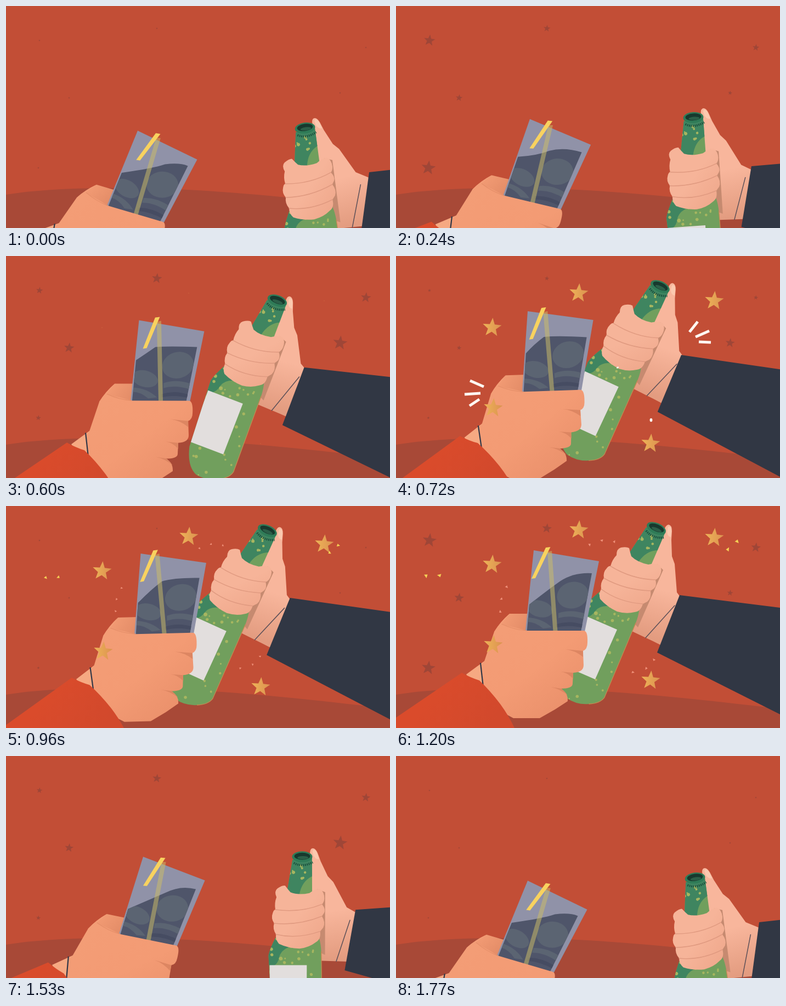
Recreate the animation shown at these times as an HTML page with a canvas. Size 700 by 406 pixels, loop 1800 ms.

```html
<!DOCTYPE html>
<html lang="en">
<head>
<meta charset="utf-8">
<title>Cheers</title>
<style>
html, body { margin: 0; width: 100%; height: 100%; overflow: hidden; background: #c24e36; }
canvas { display: block; }
</style>
</head>
<body>
<canvas id="stage" width="700" height="406"></canvas>
<script>
const ctx = document.getElementById('stage').getContext('2d');
const LOOP = 1800;
const TIMES = [0, 240, 480, 720, 1200, 1530, 1770, LOOP];

// Motion channels: one value per time, returning to the first at the end
const GLASS = { x: [240, 244, 245, 240, 251, 250], y: [228, 207, 143, 101, 81, 184],
  r: [16.4, 13.4, 4, -1.9, 0, 11.5], pivot: [251, 81] };
const BOTTLE = { x: [545, 542, 514, 482, 475, 540], y: [222, 203, 122, 55, 40, 183],
  r: [-31, -27.5, -10.3, 1.3, 0, -23.5], pivot: [475, 40] };
const SLEEVE = { x: [662, 648, 583, 520, 517, 637], y: [304, 293, 237, 181, 163, 281],
  r: [-13.7, -12, -4.3, 1.2, 0, -11.2], pivot: [517, 163] };
const LIQUID = { left: [163, 153, 152, 158, 180, 180], midX: [316, 299, 285, 279, 300, 303],
  midY: [126, 129, 131, 129, 137, 138], right: [117, 118, 126, 132, 123, 120] };
const STRAW = [1, 0.95, 1, 0.3, 0, 0.88];
const RISE = [24, 24, 24, 24, 0, 0];

const clamp = v => Math.max(0, Math.min(1, v));
const ramp = (t, a, b) => clamp((t - a) / (b - a));
const smooth = u => u * u * (3 - 2 * u);

// Monotone cubic through the channel's values
function at(channel, t) {
  const v = [...channel, channel[0], channel[0]];
  const slope = k => (v[k + 1] - v[k]) / (TIMES[k + 1] - TIMES[k]);
  const tangent = k => {
    if (k === 0 || k === v.length - 1) return 0;
    const a = slope(k - 1), b = slope(k);
    return a * b > 0 ? 2 * a * b / (a + b) : 0;
  };
  let i = 0;
  while (i < TIMES.length - 2 && t >= TIMES[i + 1]) i++;
  const h = TIMES[i + 1] - TIMES[i], u = (t - TIMES[i]) / h, s = smooth(u);
  return v[i] * (1 - s) + v[i + 1] * s
    + h * u * (1 - u) * ((1 - u) * tangent(i) - u * tangent(i + 1));
}

function fill(path, color) {
  ctx.fillStyle = color;
  ctx.fill(typeof path === 'string' ? new Path2D(path) : path);
}

function stroke(path, color, width, cap = 'round') {
  ctx.strokeStyle = color;
  ctx.lineWidth = width;
  ctx.lineCap = cap;
  ctx.stroke(new Path2D(path));
}

function blend(x0, y0, x1, y1, ...colors) {
  const g = ctx.createLinearGradient(x0, y0, x1, y1);
  colors.forEach((c, i) => g.addColorStop(i / (colors.length - 1), c));
  return g;
}

function oval(x, y, rx, ry, turn, color) {
  ctx.beginPath();
  ctx.ellipse(x, y, rx, ry, turn, 0, Math.PI * 2);
  ctx.fillStyle = color;
  ctx.fill();
}

function posed(pose, t, draw) {
  ctx.save();
  ctx.translate(at(pose.x, t), at(pose.y, t));
  ctx.rotate(at(pose.r, t) * Math.PI / 180);
  ctx.translate(-pose.pivot[0], -pose.pivot[1]);
  draw(t);
  ctx.restore();
}

function clipped(path, draw) {
  ctx.save();
  ctx.clip(path);
  draw();
  ctx.restore();
}

function star(x, y, radius, turn, color) {
  ctx.beginPath();
  for (let i = 0; i < 10; i++) {
    const a = turn + i * Math.PI / 5, r = i % 2 ? radius * 0.42 : radius;
    ctx.lineTo(x + r * Math.sin(a), y - r * Math.cos(a));
  }
  ctx.fillStyle = color;
  ctx.fill();
}

// Background stars: x, y and the moment of full size within 900 ms
const TWINKLES = [[61, 63, 330], [275, 41, 460], [656, 76, 460],
  [115, 168, 460], [609, 159, 620], [59, 296, 230]];

function backdrop(t) {
  fill('M0 0H700V406H0Z', '#c24e36');
  fill('M0 345C90 330 230 331 330 336S560 354 700 371V406H0Z', '#a84937');
  const p = t % 900;
  for (const [x, y, peak] of TWINKLES) {
    const u = p < peak ? p / (2 * peak) : 0.5 + (p - peak) / (2 * (900 - peak));
    star(x, y, 1.8 + 11.8 * Math.sin(Math.PI * u) ** 3, 0.12, '#9f4637');
  }
}

// Bottle and right hand
const bottleShape = new Path2D('M456 39L422 91L380 150Q354 170 346 182L302 300' +
  'Q296 336 312 352Q330 364 352 362Q372 361 380 350L437 214Q446 190 442 180L465 108L490 50Z');
let seed = 11;
const random = () => (seed = seed * 16807 % 2147483647) / 2147483647;
const bubbles = Array.from({ length: 150 }, () =>
  [300 + random() * 190, 55 + random() * 305, 1.2 + random() * 2.3]);

function bottle() {
  // Thumb, palm and wrist
  fill('M488 48Q491 34 497 34Q503 35 503 46L502 62L503 92L508 106L512 158L527 178' +
    'L490 258L468 247L430 229L440 180L462 108Z',
    blend(450, 235, 475, 150, '#e39c80', '#f8b69c'));
  fill('M496 38Q503 35 502 48L501 57Q495 56 494 47Z', '#fbc9af');
  fill('M476 106L487 117L441 222L432 212Z', '#c68a70');
  stroke('M508 182L455 241', '#5b5058', 1.5);

  fill(bottleShape, '#719f5d');
  clipped(bottleShape, () => {
    fill('M450 20H500L480 81Q460 80 446 97L436 110L410 100Z', '#3f8560');
    fill('M385 140L394 184Q374 180 364 191Q354 206 342 202L330 180Z', '#3f8560');
    for (const [x, y, r] of bubbles) oval(x, y, r, r, 0, '#a7b660');
    fill('M341 199L403 226L363 317L301 290Z', '#e2dedd');
  });
  stroke('M437 214L380 350Q372 361 352 362', '#c08a52', 1.3);

  // Lip
  ctx.setLineDash([2, 1.5]);
  stroke('M456 45Q466 59 488 58', '#1d5440', 4, 'butt');
  ctx.setLineDash([]);
  oval(474.5, 41, 18.5, 10, 0.41, '#2f7b57');
  oval(475, 40, 14.5, 6.5, 0.41, '#17392e');
  oval(475, 43, 10, 3, 0.41, '#2c5f48');

  // Fingers
  fill('M402 90Q402 78 410 76Q420 74 425 77Q427 86 429 92Q440 103 460 107Q474 104 481 108' +
    'Q486 116 481 127Q478 133 473 135Q476 146 470 151L464 155Q466 168 458 175L450 179' +
    'Q446 193 435 194Q420 198 403 193Q384 184 372 170Q369 160 374 152Q372 140 379 132' +
    'Q377 121 384 114Q388 109 391 110Q394 98 402 90Z',
    blend(390, 90, 440, 194, '#f6b499', '#f6b499', '#f0a98d'));
  for (const crease of ['M391 110Q430 134 473 135', 'M379 132Q418 154 464 155',
    'M374 152Q406 176 450 179'])
    stroke(crease, '#e09a80', 1.5);
}

function rightSleeve() {
  fill('M517 163L476 268L900 482V211Z', '#313744');
}

// Glass and left hand
function glass(t) {
  fill('M207 197H244V236H182L179 230Q190 212 207 197Z',
    blend(195, 205, 235, 230, '#f29b74', '#e38c67'));
  fill('M251 81L370 101L342 240L235 238Z', '#9092a8');

  const left = at(LIQUID.left, t), mx = at(LIQUID.midX, t),
    my = at(LIQUID.midY, t), right = at(LIQUID.right, t);
  const lx = 253 - 0.1 * (left - 81);
  const liquid = new Path2D(`M${lx} ${left}Q${mx - 20} ${my + 14} ${mx} ${my}` +
    `Q${mx + 25} ${Math.min(my, right) - 2} 357 ${right}L336 236H238Z`);
  fill(liquid, '#4f556a');
  clipped(liquid, () => {
    const light = '#5b6472';
    oval(322, 163, 29, 24, -0.3, light);
    oval(262, 188, 24, 15, 0.25, light);
    fill('M296 196Q318 188 346 197V208Q318 198 296 205Z', light);
    fill('M240 204Q266 205 284 222L268 224Q254 212 240 212Z', light);
    fill('M292 216Q318 208 345 218V224Q316 216 292 222Z', '#464c62');
  });

  const s = at(STRAW, t), top = 277 + 11 * s, low = 250.5 + 16.5 * s;
  fill(`M${top - 1} 84L${top + 7} 82L295 236H287Z`, 'rgba(204,188,104,.52)');
  fill(`M${top - 4} 76L${top + 4.5} 75L${low + 3.5} 132L${low - 3.5} 133Z`, '#f8d25f');

  // Forearm, hand and cuff
  fill('M166 280L128 308L170 370L230 380L220 260Z', '#f6a982');
  fill('M207 197Q190 212 179 230L161 284L154 292L158 330L190 375L214 388H262L290 372L313 357' +
    'Q314 341 300 334Q322 334 322 325L323 305Q342 304 342 291L341 265Q349 262 349 250' +
    'Q350 228 342 228L238 228L216 222L192 217Z',
    blend(180, 230, 300, 385, '#f39d76', '#f39b74', '#ea906b'));
  fill('M309 262L341 265L341 276Q326 264 309 262Z', '#dd8662');
  fill('M300 303L323 305V316Q312 304 300 303Z', '#dd8662');
  fill('M282 331L302 334L313 346Q298 334 282 331Z', '#dd8662');
  stroke('M193 216Q214 226 238 228', '#e58f69', 1.2);
  stroke('M154 287L159 331', '#303747', 2.2, 'butt');
  fill('M120 305Q136 314 152 319Q172 338 190 362Q206 384 217 408L240 540H-200L-121 470Z',
    blend(60, 350, 160, 420, '#da4b2b', '#d2492c'));
}

// A stroke that grows along its path and then leaves at the far end
function streak(path, length, head, tail, width) {
  if (head <= tail) return;
  ctx.setLineDash([(head - tail) * length, 1000]);
  ctx.lineDashOffset = -tail * length;
  stroke(path, '#fff8f2', width, 'butt');
  ctx.setLineDash([]);
  ctx.lineDashOffset = 0;
}

const SWOOSHES = ['M317 250Q350 247 374 230', 'M284 274Q325 272 358 259'];
const SPARKS = ['M160 239L135 228', 'M154 251L125 253', 'M152 262L134 274',
  'M535 139L550 120', 'M546 148L571 137', 'M552 157L574 158'];
const GOLD = [[333, 44], [175, 107], [177, 254], [580, 58], [464, 319]];
const YELLOW = [[55, 128], [79, 127], [605, 79], [622, 65]];
const PINK = [[353, 71], [375, 63], [398, 65], [202, 148], [192, 170], [190, 193],
  [432, 304], [456, 297], [470, 281]];

function effects(t) {
  for (const path of SWOOSHES)
    streak(path, 77, ramp(t, 390, 475), ramp(t, 490, 580), 3);
  for (const path of SPARKS)
    streak(path, 30, ramp(t, 620, 710), ramp(t, 725, 840), 5);

  if (t > 450 && t < 510) stroke('M395 358L400 354', '#fbe3cf', 1.5);
  if (t > 670 && t < 770) {
    oval(404, 204, 2.2, 1.5, -0.5, '#fff8f2');
    oval(465, 300, 2.4, 3.2, 0, '#fff8f2');
  }

  const size = 18 * smooth(ramp(t, 590, 690)) * (1 - smooth(ramp(t, 1300, 1440)));
  const rise = at(RISE, t);
  if (size > 0) {
    for (const [x, y] of GOLD)
      star(x, y + rise, size, 0.08, blend(x - 16, 0, x + 16, 0, '#eeb358', '#dc9350'));
  }

  const grain = 3 * ramp(t, 880, 980) * (1 - ramp(t, 1250, 1400));
  if (grain > 0) {
    const spread = 1 + (t - 1200) / 4000;
    const scatter = (list, color, scale) => list.forEach(([x, y], i) => {
      ctx.save();
      ctx.translate(350 + (x - 350) * spread, 180 + (y - 180) * spread);
      ctx.rotate(i * 1.9 + t / 400);
      ctx.scale(grain * scale, grain * scale);
      fill('M0 -1.1L.9 .8L-.8 .6Z', color);
      ctx.restore();
    });
    scatter(YELLOW, '#f5d155', 1.25);
    scatter(PINK, '#f0917a', 0.9);
  }
}

function frame(now) {
  const t = now % LOOP;
  backdrop(t);
  posed(BOTTLE, t, bottle);
  posed(SLEEVE, t, rightSleeve);
  posed(GLASS, t, glass);
  effects(t);
  requestAnimationFrame(() => frame(performance.now() - start));
}
const start = performance.now();
frame(0);
</script>
</body>
</html>
```
